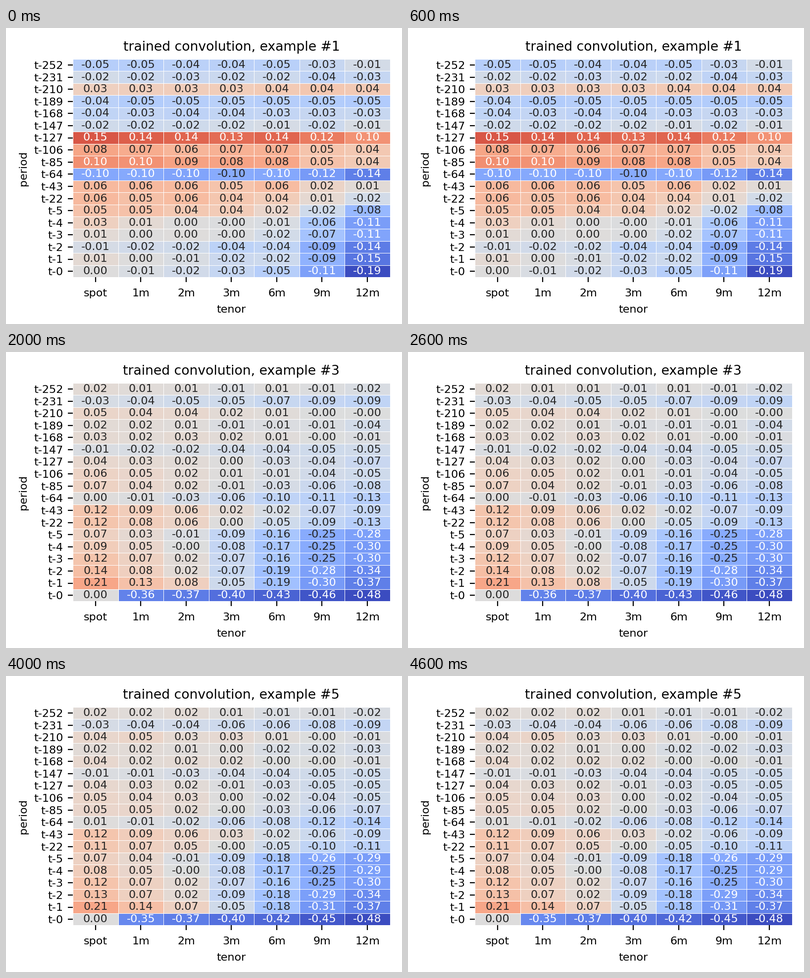
These frames come from a looping animation (800x600 px, 5 s). A matplotlib script:

```python
import matplotlib.pyplot as plt
import numpy as np
from matplotlib.animation import FuncAnimation

W, H, DPI = 800, 600, 200
LEFT, RIGHT, TOP, BOTTOM = 135, 775.8, 62.6, 505.4

TENORS = ["spot", "1m", "2m", "3m", "6m", "9m", "12m"]
LAGS = np.round(np.r_[np.linspace(252, 22, 12), 5:-1:-1]).astype(int)
ROWS, COLS = len(LAGS), len(TENORS)

# Each kernel runs from its spot weights to its 12m weights (in hundredths)
# along a shared profile over the tenors.
SEASONAL = dict(
    spot=[-5, -2, 3.5, -5, -3.5, -2, 14, 7.5, 10, -10, 6, 5.5, 5.5, 2, 1.5, -0.5, 1, 0],
    far=[-2, -3, 4, -5, -3, -1.5, 9, 4, 3, -13, 1, -1, -8, -11, -11, -14.5, -15.5, -17.5],
    profile=np.interp(range(COLS), [0, 4, 6], [0, 0.24, 1]),
)
RECENT = dict(
    spot=[2, -3, 5, 2, 3.5, -1.5, 4.5, 5.5, 5.5, 0.5, 11, 11, 7.5, 9, 12, 13, 20.5, -34],
    far=[-1.5, -9, -0.5, -3, -1, -5.5, -6, -5.5, -7.5, -13, -8.5, -12.5, -29, -29.5, -30, -34, -37, -48],
    profile=np.interp(range(COLS), [0, 2, 5, 6], [0, 0.23, 0.89, 1]),
)


def make_weights(kernel, lowest, seed):
    spot, far = np.array(kernel["spot"]), np.array(kernel["far"])
    weights = spot[:, None] + np.outer(far - spot, kernel["profile"])
    weights += np.random.default_rng(seed).normal(0, 0.5, weights.shape)
    weights = np.maximum(weights, lowest)
    weights[-1, 0], weights[-1, -1] = 0, lowest
    return weights / 100


kernels = [(SEASONAL, -18.6), (RECENT, -46), (RECENT, -48), (SEASONAL, -16), (RECENT, -48.4)]
examples = [make_weights(kernel, lowest, seed) for seed, (kernel, lowest) in enumerate(kernels)]


def luminance(rgba):
    rgb = rgba[:, :3]
    linear = np.where(rgb <= 0.03928, rgb / 12.92, ((rgb + 0.055) / 1.055) ** 2.4)
    return linear @ [0.2126, 0.7152, 0.0722]


plt.rcParams.update({"font.family": "DejaVu Sans", "font.size": 8})
fig = plt.figure(figsize=(W / DPI, H / DPI), dpi=DPI)
ax = fig.add_axes([LEFT / W, 1 - BOTTOM / H, (RIGHT - LEFT) / W, (BOTTOM - TOP) / H])

mesh = ax.pcolormesh(examples[0], cmap="coolwarm", edgecolors="white", linewidth=0.3)
labels = [
    ax.text(c + 0.5, r + 0.5, "", ha="center", va="center")
    for r in range(ROWS)
    for c in range(COLS)
]

ax.set(xlim=(0, COLS), ylim=(ROWS, 0))
ax.set_xlabel("tenor", labelpad=4.8)
ax.set_ylabel("period")
ax.set_xticks(np.arange(COLS) + 0.5, TENORS)
ax.set_yticks(np.arange(ROWS) + 0.5, [f"t-{lag}" for lag in LAGS])
ax.tick_params(axis="x", pad=4.6)
ax.spines[:].set_visible(False)


def update(i):
    weights = examples[i]
    peak = np.abs(weights).max()
    mesh.set_array(weights)
    mesh.set_clim(-peak, peak)
    flat = weights.ravel()
    for label, value, lum in zip(labels, flat, luminance(mesh.to_rgba(flat))):
        label.set_text(f"{value:.2f}")
        label.set_color("0.15" if lum > 0.408 else "white")
    ax.set_title(f"trained convolution, example #{i + 1}")
    return [mesh, *labels, ax.title]


anim = FuncAnimation(fig, update, frames=len(examples), interval=1000, repeat=True, repeat_delay=0)
plt.show()
```
